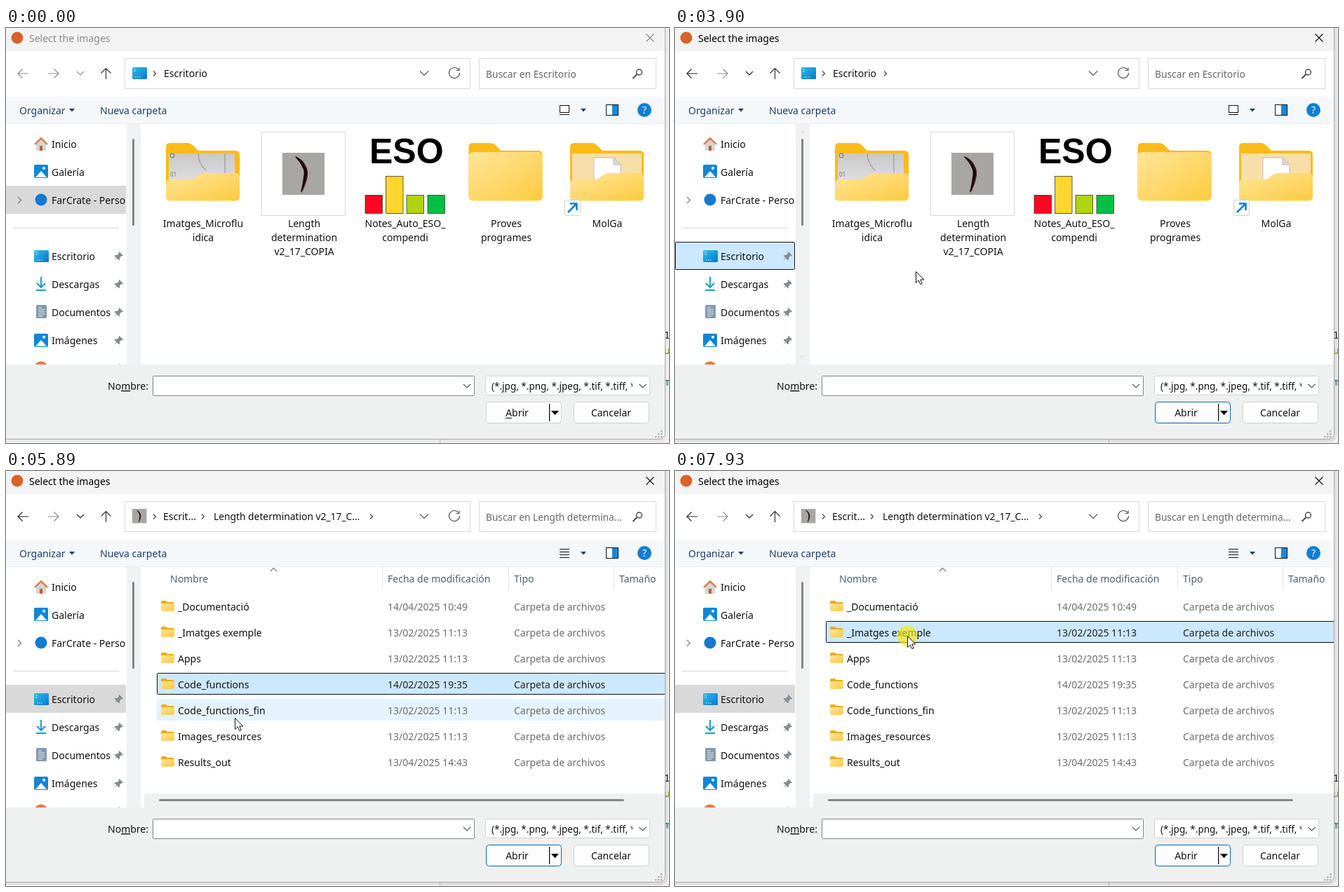
An HTML page that plays this animation: 945 by 592 pixels, repeating every 7.99 s.

```html
<!DOCTYPE html>
<html lang="es">
<head>
<meta charset="utf-8">
<title>Select the images</title>
<style>
html, body { margin: 0; width: 100%; height: 100%; overflow: hidden; background: #f4f4f4 }
svg { display: block; font: 14px "Noto Sans", "Open Sans", sans-serif }
text { white-space: pre }
.line { fill: none; stroke-width: 1.2 }
</style>
</head>
<body>
<svg id="stage" width="945" height="592" viewBox="0 0 945 592"></svg>
<script>
const INK = '#111', GREY = '#6d6d6d', NAVY = '#1b3f66', HOVER = '#e5f3ff', PICK = '#cce8ff';

const text = (x, y, s, fill = INK, more = '') => `<text x="${x}" y="${y}" fill="${fill}" ${more}>${s}</text>`;
const plain = (x, y, s) => `<text x="${x}" y="${y}">${s}</text>`;
const mid = (x, y, s) => text(x, y, s, INK, 'text-anchor="middle"');
const rect = (x, y, w, h, fill, more = '') => `<rect x="${x}" y="${y}" width="${w}" height="${h}" fill="${fill}" ${more}/>`;
const frame = (x, y, w, h, fill, stroke, more = '') => rect(x + .5, y + .5, w, h, fill, `stroke="${stroke}" ${more}`);
const line = (d, stroke = '#555', more = '') => `<path class="line" d="${d}" stroke="${stroke}" ${more}/>`;
const shape = (d, fill, more = '') => `<path d="${d}" fill="${fill}" ${more}/>`;
const group = (id, s) => `<g id="${id}">${s}</g>`;
const at = (x, y, s) => `<g transform="translate(${x} ${y})">${s}</g>`;
const down = (x, y, c, r = 5) => line(`M${x - r} ${y - r / 2}l${r} ${r}l${r} ${-r}`, c);
const next = (x, y) => line(`M${x - 2} ${y - 3.5}l3.5 3.5l-3.5 3.5`, '#444');
const drop = (x, y, c) => shape(`M${x - 4} ${y - 2}h8l-4 4.5z`, c);

// Icons, drawn from their top left corner
const desktop = rect(0, 0, 21, 17, 'url(#sea)', 'rx="1.5"') + shape('M2.5 3h2M2.5 6h2M4 14h1.5M7 14h1.5M10 14h1.5', 'none', 'stroke="#d5f3ff"');
const picture = rect(0, 0, 20, 19, '#0f86d6', 'rx="2"') + shape('M2 18L10 9l8 9z', '#fff') + '<circle cx="14" cy="5" r="2" fill="#fff"/>';
const home = shape('M3 8v11h5v-6h4v6h5V8L10 2z', '#d5d5d5') + line('M1 10L10 1.5L19 10', '#d9793f', 'style="stroke-width:2.4"') + rect(8, 12, 4, 7, '#b7653a');
const arrowDown = line('M8 0v15M2 9l6 6l6-6M1 19h14', '#1a9cc0', 'style="stroke-width:2"');
const page = rect(0, 0, 15, 19, '#8499ae', 'rx="1.5"') + line('M3 4h5M3 7h9M3 10h9M3 13h9M3 16h6', '#e9f1f8');
const pin = shape('M7.5 0L13 5.5L11.5 6.5L10.5 6L8 9V11.5L7 12.5L4 9.5L0 13L3.3 8.8L.5 6L1.5 5H4L7 2.5L6.5 1z', '#858c92');
const smallFolder = shape('M0 2q0-2 2-2h5l2 2h8q1.5 0 1.5 1.5V13q0 1.5-1.5 1.5H1.5Q0 14.5 0 13z', '#f0a91c')
  + rect(0, 4, 18.5, 10.5, 'url(#gold)', 'rx="1.5"');
const worm = rect(0, 0, 60, 60, '#a8a6a4')
  + shape('M19 6Q29 11 32 18Q37 26 34.500 36Q33 44 27 55Q30 43 30.500 36Q33 26 29 20Q26 13 19 6z', '#12090b', 'stroke="#12090b" stroke-width="1.5" stroke-linejoin="round"')
  + shape('M24 10Q33 17 35.500 27Q35 40 27.500 57', 'none', 'stroke="#87202b" stroke-width=".8"');

const folderBack = shape('M0 6Q0 0 6 0H31Q35 0 38 3L46 11H99Q105 11 105 17V76Q105 82 99 82H6Q0 82 0 76z', '#fdbb17');
const closedFront = rect(0, 13, 105, 69.5, 'url(#gold)', 'rx="6"');
const openFront = shape('M0 58Q0 52 6 52H35Q39 52 43 49L47 46Q51 43 55 43H99Q105 43 105 49V76Q105 82.5 99 82.5H6Q0 82.5 0 76z', 'url(#gold)');
const photo = rect(4, 15, 94, 45, 'url(#mist)') + '<circle cx="9" cy="18" r="3" fill="none" stroke="#666"/>'
  + line('M46 15Q46 29 57 39M56 45H84V15', '#999') + text(6, 48, '01', '#777', 'font-size="8"');
const sheet = rect(3, 15, 99, 50, '#f6dfa9') + shape('M34 21H62L72 31V60H34z', '#fff', 'stroke="#b9b9b9"')
  + shape('M62 21V31H72z', '#ddd', 'stroke="#b9b9b9"');
const bigFolder = (x, inside, front) => at(x, 164, folderBack + inside + front);
const label = (x, ...rows) => rows.map((s, i) => mid(x, 284 + 20 * i, s)).join('');
const bar = (x, h, c) => frame(x, 264 - h, 24.5, h, c, '#3a3a22', 'stroke-width=".8"');

const side = [
  ['Inicio', 40, 156, home], ['Galería', 40, 195, picture],
  ['FarCrate - Perso', 40, 236, '<circle cx="10" cy="9" r="8.5" fill="#1479d1"/>'], null,
  ['Escritorio', 40, 317, desktop, 1], ['Descargas', 42, 355, arrowDown, 1],
  ['Documentos', 43, 395, page, 1], ['Imágenes', 40, 436, picture, 1]
];
const sideRows = side.map((r, i) => r ? text(65, 171 + 40 * i, r[0]) + at(r[1], r[2], r[3])
  + (r[4] ? at(154, 159 + 40 * i, pin) : '') : '').join('');

const files = [
  ['_Documentació', '14/04/2025 10:49'], ['_Imatges exemple', '13/02/2025 11:13'],
  ['Apps', '13/02/2025 11:13'], ['Code_functions', '14/02/2025 19:35'],
  ['Code_functions_fin', '13/02/2025 11:13'], ['Images_resources', '13/02/2025 11:13'],
  ['Results_out', '13/04/2025 14:43']
];
const fileRows = files.map(([name, date], i) => at(0, 37 * i, at(221, 185, smallFolder) + text(245, 199, name)
  + group('info' + i, plain(544, 199, date) + plain(724, 199, 'Carpeta de archivos')))).join('');

const gradient = (id, a, b, dir = 'x2="1" y2="1"') =>
  `<linearGradient id="${id}" ${dir}><stop stop-color="${a}"/><stop offset="1" stop-color="${b}"/></linearGradient>`;
let dots = '';
for (let i = 0; i < 3; i++) for (let j = 0; j <= i; j++) dots += rect(933 - 4 * j, 574 + 4 * i, 2.5, 2.5, '#b4b4b4');

const icons = group('icons',
  rect(358, 144, 132, 191, HOVER, 'id="tile"')
  + bigFolder(228, photo, openFront) + label(281, 'Imatges_Microflu', 'idica')
  + frame(364, 148, 119, 119, '#fff', '#d9d9d9') + at(394, 178, worm) + label(425, 'Length', 'determination', 'v2_17_COPIA')
  + text(518, 193, 'ESO', '#000', 'style="font:bold 50px Liberation Sans,sans-serif"')
  + bar(511.5, 26, '#ff0522') + bar(541, 53, '#ffd62d') + bar(570.5, 26, '#b0d411') + bar(600.5, 26, '#00c044')
  + label(569, 'Notes_Auto_ESO_', 'compendi')
  + bigFolder(659.5, '', closedFront) + label(713, 'Proves', 'programes')
  + bigFolder(804, sheet, openFront) + label(857, 'MolGa')
  + frame(796, 245, 22, 22, '#fff', '#d0d0d0', 'rx="2"')
  + shape('M801 263L813 251M804 250.5H813.5V260', 'none', 'stroke="#1380d2" stroke-width="2.6"'));

const list = group('list',
  rect(215, 214, 730, 31, HOVER, 'id="hover"') + frame(215, 288, 740, 30, PICK, INK, 'id="picked" rx="1"')
  + text(234, 159, 'Nombre', '#4f5f70') + text(544, 159, 'Fecha de modificación', '#4f5f70')
  + text(724, 159, 'Tipo', '#4f5f70') + text(874, 159, 'Tamaño', '#4f5f70')
  + [536, 716, 866].map(x => rect(x, 137, 1, 33, '#e2e2e2')).join('')
  + line('M377 143l4.5-4.5l4.5 4.5', '#777') + fileRows
  + rect(197, 460, 742, 20, '#eff1f1') + rect(218, 468, 663, 3, '#858585', 'rx="1.5"'));

const stage = document.getElementById('stage');
stage.innerHTML = `<defs>${gradient('sea', '#2cc0e4', '#0a74cf')}${gradient('gold', '#ffe699', '#ffca40')}
  ${gradient('mist', '#c9c9c9', '#e0e0e0', 'x2="0" y2="1"')}
  <clipPath id="win"><rect x="-20" y="-20" width="959" height="606" rx="8"/></clipPath>
  <clipPath id="pane"><rect y="137" width="171" height="343"/></clipPath>
  <clipPath id="types"><rect x="684" y="497" width="209" height="28"/></clipPath></defs>`
  + rect(0, 0, 945, 592, '#f5f5f5') + rect(618, 586, 327, 6, '#f6eef0') + rect(618, 586, 1, 6, '#bbb')
  + `<g style="font-family:Noto Sans Mono,monospace">${text(938, 443, '1')}${text(938, 465, 'u', '#8a8a10')}${text(938, 510, 'm', '#17606a')}</g>`
  + group('shade', frame(-20, -20, 961, 608, 'none', '#000', 'rx="9" stroke-width="4" opacity=".09"'))
  + frame(-20, -20, 959, 606, '#eef1f0', '#a9a9a9', 'rx="8"')
  + '<g clip-path="url(#win)">'
  + rect(0, 0, 939, 33, '#f3f3f3') + rect(0, 33, 939, 65, '#fff') + rect(0, 98, 939, 39, '#f5f8fb') + rect(0, 136, 939, 1, '#e8ecef')
  + rect(0, 137, 939, 343, '#fff') + rect(172, 137, 20, 343, '#eff2f2')
  // title bar and navigation
  + '<circle cx="16" cy="14" r="8.5" fill="#d9622b"/>'
  + group('title', plain(33, 20, 'Select the images'))
  + line('M912.5 8.5l11 11M923.5 8.5l-11 11', 'currentColor', 'id="close"')
  + group('back', line('M32 65H17M23.5 58.5L17 65L23.5 71.5', 'currentColor') + down(106, 64.5, 'currentColor'))
  + line('M60 65H75M68.5 58.5L75 65L68.5 71.5', '#8d8d8d') + line('M142.5 73V57.5M135.5 64.5L142.5 57.5L149.5 64.5', '#333')
  + frame(169, 43, 492, 43, '#fff', '#d9d9d9') + frame(674, 43, 252, 43, '#fff', '#d9d9d9')
  + down(596, 64.5, '#555', 6) + line('M645 59.5A7.5 7.5 0 1 0 646.5 64M646 56.5V60.5H641.5', '#555')
  + line('M899.5 66L893.5 72', '#444', 'style="stroke-width:1.8"') + '<circle cx="902.5" cy="63" r="4" fill="none" stroke="#444" stroke-width="1.4"/>'
  + next(212, 65)
  + group('homePath', at(180, 56, desktop) + text(225, 70, 'Escritorio') + text(684, 71, 'Buscar en Escritorio', '#666', 'font-size="13.8"'))
  + group('homeNext', next(300, 65))
  + group('deepPath', at(180, 54, `<g transform="scale(.34)">${worm}</g>`) + text(224, 70, 'Escrit...') + next(281, 65)
    + text(296, 70, 'Length determination v2_17_C...', INK, 'font-size="13.8"')
    + text(684, 71, 'Buscar en Length determina...', '#666', 'font-size="13.7"'))
  + group('deepNext', next(521, 65))
  // toolbar
  + text(19, 123, 'Organizar', NAVY) + drop(94, 117, NAVY) + text(134, 123, 'Nueva carpeta', NAVY)
  + group('tileMode', frame(789, 110, 13, 10, '#fff', INK) + rect(789, 123, 14, 1, INK))
  + group('listMode', [111, 115, 119, 123].map(y => rect(789, y, 14, 1, INK)).join(''))
  + drop(823, 117, NAVY) + frame(855, 109, 17, 15, '#fff', INK) + rect(864, 110, 8, 14, '#1588dc')
  + '<circle cx="910" cy="117" r="10" fill="#0f7fd3"/>' + text(910, 122, '?', '#fff', 'text-anchor="middle"')
  // sidebar
  + '<g clip-path="url(#pane)">' + rect(0, 225, 171, 40, '#d9d9d9', 'id="sidePick"') + rect(0, 305, 171, 40, HOVER, 'id="sideHover"')
  + frame(0, 305, 170, 39, PICK, INK, 'id="sideFocus" rx="1"')
  + sideRows + line('M17 241l4.5 4.5l-4.5 4.5', '#777') + rect(10, 285, 151, 1, '#d5d5d5')
  + '<circle cx="50" cy="485" r="9.5" fill="#e8793c"/>' + at(154, 479, pin) + '</g>'
  + rect(180, 158, 3, 124, '#858585', 'rx="1.5"')
  + group('scrollEnds', shape('M177.5 150l4-5l4 5zM177.5 467l4 5l4-5z', '#e3e6e6'))
  + icons + list
  // file name and buttons
  + text(145, 516, 'No<tspan text-decoration="underline">m</tspan>bre:')
  + frame(209, 496, 458, 28, '#fff', '#858585', 'rx="1"') + down(657, 510.5, '#555')
  + frame(683, 496, 234, 27, '#fff', '#d2d2d2', 'rx="2"') + down(907.5, 510.5, '#555')
  + `<g clip-path="url(#types)">${text(692, 516, '(*.jpg, *.png, *.jpeg, *.tif, *.tiff, *.bmp)', INK, 'font-size="13.5"')}</g>`
  + frame(684, 533, 107, 30, '#fdfdfd', '#d0d0d0', 'id="open" rx="4"') + rect(774, 536, 1.3, 25, INK)
  + shape('M777 546h11l-5.5 6z', '#000') + mid(728.5, 554, 'Abrir') + rect(712, 556, 9, 1, INK, 'id="accel"')
  + frame(809, 533, 107, 30, '#fdfdfd', '#d0d0d0', 'rx="4"') + mid(862.5, 554, 'Cancelar')
  + dots + '</g>'
  + group('pointer', '<circle id="ring" r="14" fill="#f5e800" opacity=".68"/>'
    + shape('M.5 .5V16.5L4.3 13L6.8 18.7L9.3 17.6L6.8 12H11.8z', '#fff', 'id="arrow" stroke="#111"')
    + shape('M-2 2a2 2 0 0 1 4 0V9c0-2 3.3-2 3.3 .5c0-1.5 3-1 3 1c0-1.5 2.7-1 2.7 1V16c0 3-2 3-2 6.5H-.5c0-3-3-4-5.2-8.5c-1-2 1.5-3 2.5-1.5L-2 14z',
      '#fff', 'id="hand" stroke="#111" stroke-width="1.1"'));

const el = id => document.getElementById(id);
const show = (id, on) => el(id).style.display = on ? '' : 'none';
const during = (t, a, b) => t >= a && t < b;

const LOOP = 7990;
const route = [
  [400, 640, 594], [1180, 314, 415], [1240, 312, 414], [1640, 106, 333], [3590, 106, 333],
  [3900, 343, 347], [4380, 408, 249], [4790, 408, 249], [4900, 383, 247], [5200, 335, 411],
  [5540, 322, 303], [5790, 322, 303], [5890, 326, 352], [6130, 330, 396], [6320, 330, 396],
  [6390, 326, 423], [6620, 326, 423], [6780, 309, 333], [7400, 316, 311], [7450, 316, 311], [7930, 331, 235]
];
const clicks = [[3300, 3430], [4450, 4500], [4550, 4610], [5660, 5790], [7930, LOOP]];

function place(t) {
  const i = route.findIndex(p => p[0] > t);
  if (i < 0) return route.at(-1).slice(1);
  if (!i) return route[0].slice(1);
  const [a, b] = [route[i - 1], route[i]], k = (t - a[0]) / (b[0] - a[0]);
  return [1, 2].map(n => Math.round(a[n] + (b[n] - a[n]) * k));
}

function draw(t) {
  const active = t >= 400, chosen = t >= 3360, inside = t >= 4610;
  const [x, y] = place(t);

  el('title').style.fill = active ? '#000' : '#8a8a8a';
  el('close').style.color = active ? '#111' : '#8a8a8a';
  el('back').style.color = chosen ? '#222' : '#8d8d8d';
  el('shade').style.opacity = active ? 1 : .5;
  el('open').setAttribute('stroke', active ? '#0067b8' : '#d0d0d0');
  show('accel', !active);

  show('homePath', !inside);
  show('homeNext', during(t, 3650, 4610));
  show('deepPath', inside);
  show('deepNext', t >= 4790);
  show('tileMode', !inside);
  show('listMode', inside);
  show('icons', !inside);
  show('list', inside);

  const overSide = active && x < 171;
  show('sidePick', !chosen || inside);
  el('sidePick').setAttribute('y', inside ? 305 : 225);
  show('sideFocus', chosen && !inside);
  show('sideHover', overSide && !chosen);
  el('sideHover').setAttribute('y', 145 + 40 * Math.floor((y - 145) / 40));
  show('scrollEnds', during(t, 1500, 2060) || during(t, 3650, 4300));
  show('tile', during(t, 3900, 4610) && x > 358);
  el('tile').setAttribute('fill', t >= 4500 ? PICK : HOVER);

  const picked = t >= 7930 ? 1 : t >= 5720 ? 3 : -1;
  const row = Math.floor((y - 214) / 37) + 1, onRow = (y - 214) % 37 < 34;
  show('hover', onRow && row !== picked);
  el('hover').setAttribute('y', 177 + 37 * row);
  show('picked', picked > 0);
  el('picked').setAttribute('y', 177.5 + 37 * picked);
  files.forEach((_, i) => el('info' + i).style.fill = i === picked ? '#222' : GREY);

  show('pointer', active);
  show('hand', overSide);
  show('arrow', !overSide);
  show('ring', clicks.some(c => during(t, ...c)));
  el('pointer').setAttribute('transform', `translate(${x} ${y})`);
}

const start = performance.now();
function tick(now) {
  draw(Math.max(0, now - start) % LOOP);
  requestAnimationFrame(tick);
}
draw(0);
requestAnimationFrame(tick);
</script>
</body>
</html>
```
